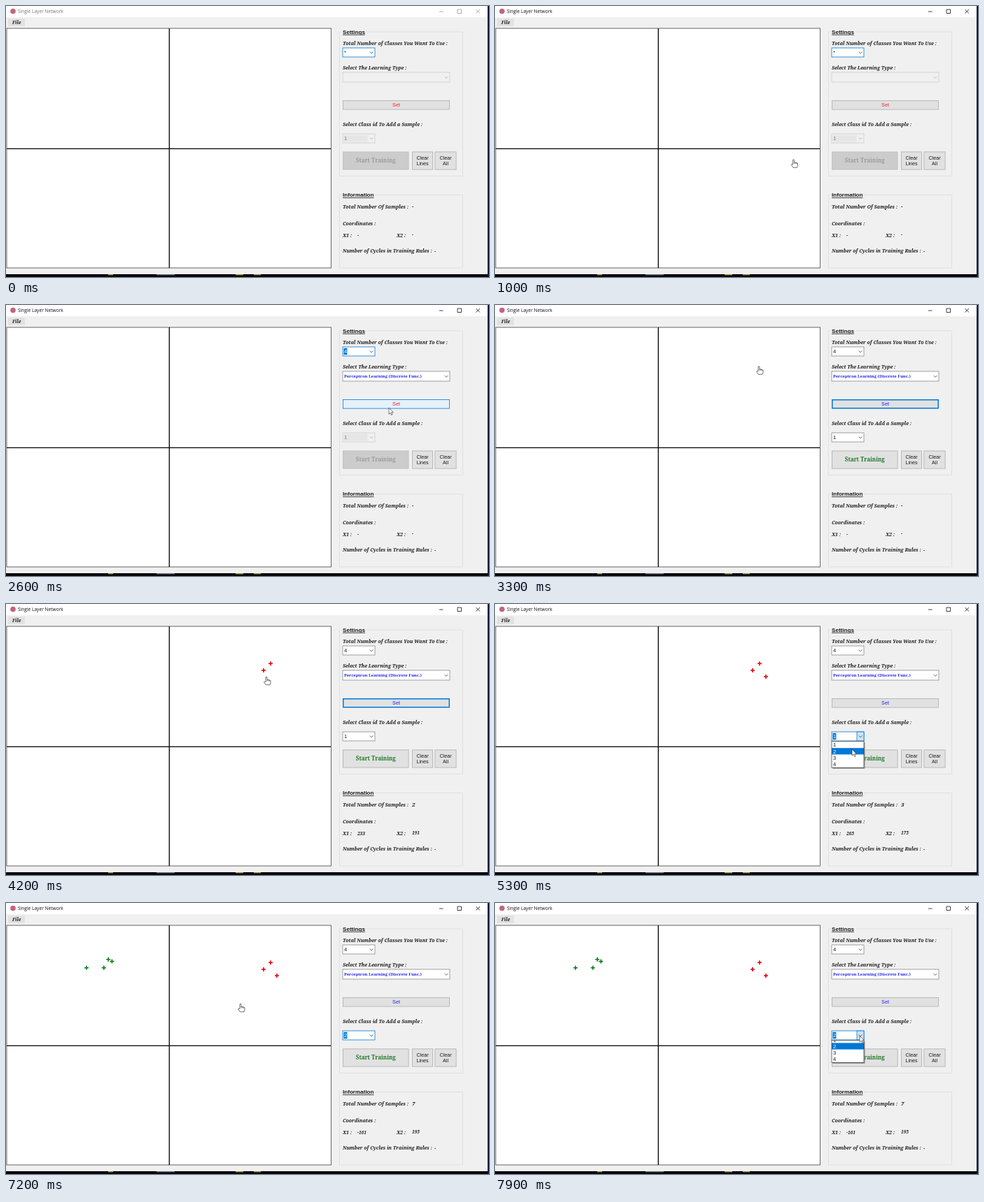
An HTML page for the animation above (8 s loop, 690x388 px).

```html
<!DOCTYPE html>
<html lang="en">
<head>
<meta charset="utf-8">
<title>Single Layer Network</title>
<style>
  html, body { margin: 0; width: 100%; height: 100%; overflow: hidden; background: #f0f0f0; }
  svg { display: block; width: 100vw; height: 100vh; }
  text { white-space: pre; }
  .sans { font-family: "Liberation Sans", Arial, sans-serif; }
  .ui { font-family: "Open Sans", "Noto Sans", sans-serif; }
  .head { font: bold 8.1px "Liberation Sans", Arial, sans-serif; text-decoration: underline; }
  .serif { font-family: "Noto Serif", serif; font-weight: bold; }
  .label { font-family: "Noto Serif", serif; font-weight: bold; font-style: italic; }
</style>
</head>
<body>
<svg id="stage" viewBox="0 0 690 388" preserveAspectRatio="none"><g id="base"></g><g id="live"></g></svg>
<script>
const LOOP = 8000, STEP = 100;
const BLUE = '#0078d7', GREY = '#adadad', INK = '#1a1a1a';

const rect = (x, y, w, h, fill, stroke = 'none', sw = 1) =>
  `<rect x="${x}" y="${y}" width="${w}" height="${h}" fill="${fill}" stroke="${stroke}" stroke-width="${sw}"/>`;
const path = (d, stroke, sw = 1, fill = 'none') =>
  `<path d="${d}" fill="${fill}" stroke="${stroke}" stroke-width="${sw}"/>`;
const text = (x, y, s, cls, size, fill = INK, anchor = 'start') =>
  `<text x="${x}" y="${y}" class="${cls}" font-size="${size}" fill="${fill}" text-anchor="${anchor}">${s}</text>`;
const label = (x, y, s, size = 6.9) => text(x, y, s, 'label', size);

// Pointer tip: time, x, y
const route = [
  [700, 332, 372], [1300, 521, 67], [1500, 521, 67], [1700, 505, 95], [1800, 505, 95],
  [1900, 627, 102], [2000, 627, 102], [2100, 560, 123], [2200, 560, 115], [2300, 552, 137],
  [2600, 547, 147], [2700, 547, 147], [2900, 440, 150], [3000, 332, 130], [3200, 376, 90],
  [3400, 378, 85], [3600, 378, 85], [3900, 368, 95], [4000, 368, 95], [4200, 372, 104],
  [4500, 387, 104], [4700, 387, 104], [5000, 517, 178], [5100, 522, 188], [5200, 522, 188],
  [5300, 510, 208], [5600, 510, 208], [6000, 146, 81], [6100, 146, 81], [6300, 115, 94],
  [6500, 115, 94], [6700, 151, 84], [6800, 151, 84], [7000, 140, 93], [7100, 140, 93],
  [7300, 530, 195], [7400, 521, 190], [8000, 521, 190]
];

const samples = [
  { t: 3500, x: 378, y: 85.3, id: 1 }, { t: 4000, x: 368, y: 95, id: 1 },
  { t: 4600, x: 387, y: 104, id: 1 }, { t: 6000, x: 146.2, y: 80.8, id: 2 },
  { t: 6300, x: 115, y: 92.8, id: 2 }, { t: 6700, x: 151.4, y: 83.6, id: 2 },
  { t: 7100, x: 139.8, y: 92.8, id: 2 }
];
const colors = { 1: '#e3000f', 2: '#0b7a1c' };
const coords = p => [Math.round((p.x - 233) * 1.7235), Math.round((204 - p.y) * 1.753)];

function pointer(t) {
  if (t < route[0][0]) return null;
  const i = route.findIndex(k => k[0] > t);
  const [t0, x0, y0] = route[i - 1], [t1, x1, y1] = route[i];
  const u = (t - t0) / (t1 - t0);
  return [x0 + (x1 - x0) * u, y0 + (y1 - y0) * u];
}

function drawPointer([x, y]) {
  const hand = x < 464 && y > 32 && y < 375;
  const shape = hand
    ? path('M-1 .8Q0-.4 1 .8V4.4L3 4.6 5 5.1 6 6.2V9L5 11.8H-.6L-3.4 7.8Q-3.2 6.2-1 7.6ZM1 4.4V6.5M3 4.6V6.6M5 5.1V6.8', '#333', .7, '#fff')
    : path('M0 0V9.2L2.1 7.3 3.6 10.5 5 9.9 3.6 6.8H6.4Z', '#222', .6, '#fff');
  return `<g transform="translate(${x} ${y})">${shape}</g>`;
}

function combo(x, y, w, h, value, o = {}) {
  const size = o.size || 7.6, base = y + h / 2 + size * .35;
  const edge = o.off ? '#cccccc' : o.focus || o.open ? BLUE : '#8a8a8a';
  let s = rect(x, y, w, h, o.off ? '#f0f0f0' : '#fff', edge, .8);
  if (o.off && value) s += rect(x + 1.5, y + 1.5, w - 12, h - 3, '#e6e6e6');
  if (o.open) s += rect(x + w - 10, y, 10, h, '#cce4f7', BLUE, .8);
  if (o.mark) s += rect(x + 1.4, y + 1.8, 5, h - 3.6, BLUE);
  s += text(x + 2, base, value, o.cls || 'sans', size, o.mark ? '#fff' : o.off ? '#777' : o.ink || INK);
  const ax = x + w - 5, ay = y + h / 2;
  return s + path(`M${ax - 2.4} ${ay - 1}l2.4 2.4 2.4-2.4`, o.off ? '#aaa' : '#444', .8);
}

function list(x, y, w, items, hot, o = {}) {
  const row = 9.2, lift = o.lift || 0, h = items.length * row + 1 - lift;
  let s = rect(x + 1.5, y + 1.5, w, h, '#999') + `<svg x="${x}" y="${y}" width="${w}" height="${h}">` + rect(0, 0, w, h, '#fff');
  items.forEach((v, i) => {
    const top = i * row + .5 - lift;
    if (i === hot) s += rect(0, top, w, row, BLUE);
    s += text(2, top + 7.3, v, o.cls || 'sans', o.size || 7.6, i === hot ? '#fff' : o.ink || INK);
  });
  return s + '</svg>' + rect(x, y, w, h, 'none', '#333', .7);
}

function button(x, y, w, h, lines, o = {}) {
  const sw = o.sw || .8, size = o.size || 7.2;
  let s = rect(x + sw / 2, y + sw / 2, w - sw, h - sw, o.fill || '#e1e1e1', o.edge || GREY, sw);
  lines.forEach((v, i) => {
    const mid = y + h / 2 + (i - (lines.length - 1) / 2) * 8.6;
    s += text(x + w / 2, mid + size * .36, v, o.cls || 'sans', size, o.ink || INK, 'middle');
  });
  return s;
}

function drawBase() {
  const group = (y, h, name, w) =>
    rect(476.5, y, 176, h, 'none', '#dcdcdc', .8) + rect(479, y - 3, w, 6, '#f0f0f0') +
    `<text x="481" y="${y + 2.8}" class="head" fill="${INK}">${name}</text>`;
  const glow = (x, w, c) => rect(x, 384, w, 1.4, c);
  return rect(0, 0, 690, 388, '#f0f0f0') + rect(0, 0, 690, 16, '#fff') +
    '<circle cx="10" cy="7.5" r="3.8" fill="#c4647c"/>' +
    rect(3, 18, 24, 11, '#e2e2e2') + label(9, 25.6, 'File', 6.6) +
    rect(1, 32, 463.5, 343, '#fff', '#555', .9) + path('M233.3 32V375M1 204.3H464', '#000', 1.3) +
    group(37, 206.5, 'Settings', 36) + group(270.5, 104.5, 'Information', 48) +
    label(481, 56, 'Total Number of Classes You Want To Use :') +
    label(481, 91, 'Select The Learning Type :') +
    label(481, 171.7, 'Select Class id To Add a Sample :') +
    label(481, 289.8, 'Total Number Of Samples :') +
    label(481, 313.6, 'Coordinates :') + label(481, 330.8, 'X1 :') + label(558, 330.8, 'X2 :') +
    label(481, 353.4, 'Number of Cycles in Training Rules :') + label(612, 353.4, '-') +
    button(580, 208.5, 30, 26, ['Clear', 'Lines']) + button(612.5, 208.5, 31, 26, ['Clear', 'All']) +
    rect(0, 384, 690, 4, '#05070c') + rect(688, 0, 2, 388, '#0b1c3c') +
    glow(146, 7, '#a89440') + glow(215, 26, '#6d7480') + glow(328, 11, '#b59a3c') + glow(354, 10, '#a89440');
}

function drawLive(t) {
  const active = t >= 700, set = t >= 2700, typed = t >= 2200;
  const openCount = t >= 1500 && t < 1800, openType = t >= 2000 && t < 2200;
  const openClass = t >= 5200 && t < 5600 || t >= 7900;
  const tint = active ? '#111' : '#999';
  const onSet = !set && t >= 2400;
  const id = t >= 5600 ? 2 : 1;
  const done = samples.filter(p => p.t <= t), last = done[done.length - 1];
  const xy = last ? coords(last) : ['-', '-'];

  let s = text(17, 10, 'Single Layer Network', 'ui', 6.6, active ? '#111' : '#777') +
    path('M619 8H624.5M645 5H650.5V10.5H645ZM671.5 5L677 10.5M677 5L671.5 10.5', tint, .8);

  for (const p of done) s += path(`M${p.x - 3} ${p.y}h6M${p.x} ${p.y - 3}v6`, colors[p.id], 1.6);

  s += combo(481, 60, 46, 13, t < 1800 ? '*' : '4', {
    focus: t < 2000 || onSet, open: openCount, mark: t >= 1500 && !set });
  s += combo(481, 95, 153, 14, typed ? 'Perceptron Learning (Discrete Func.)' : '', {
    off: t < 1800, open: openType, cls: 'serif', size: 5.9, ink: '#2424e8' });
  s += button(481, 135, 153, 13.5, ['Set'], set
    ? { ink: '#2424f0', edge: t < 5200 ? BLUE : GREY, sw: t < 5200 ? 1.5 : .8 }
    : { ink: '#f0203c', edge: onSet ? BLUE : GREY, fill: onSet ? '#e5f1fb' : '#e1e1e1' });
  s += combo(481, 183, 46, 13, id, { off: !set, focus: t >= 5200, open: openClass, mark: t >= 5200 });
  s += button(481, 208.5, 94.5, 26, ['Start Training'], {
    cls: 'serif', size: 8, ink: set ? '#1f7a2b' : '#9c9c9c', fill: set ? '#e1e1e1' : '#cccccc', edge: set ? GREY : '#bfbfbf' });

  s += label(580, 290, done.length || '-', 7.8) + label(502, 331, xy[0], 6.4) + label(580, 329.6, xy[1], 6.4);

  if (openCount) s += list(481, 73.5, 46, [2, 3, 4, 5, 6, 7, 8, 9], t >= 1600 ? 2 : -1);
  if (openType) s += list(481, 109.5, 153, ['Perceptron Learning (Discrete Func.)', 'Delta Learning (Continuous Func.)'],
    t >= 2100 ? 0 : -1, { cls: 'serif', size: 5.9, ink: '#2424e8' });
  if (openClass) s += list(481, 196.5, 46, [1, 2, 3, 4], t < 5300 ? 0 : 1, { lift: t >= 7900 ? 5.8 : 0 });

  const tip = pointer(t);
  return tip ? s + drawPointer(tip) : s;
}

const live = document.getElementById('live');
document.getElementById('base').innerHTML = drawBase();
const start = performance.now();
let shown = -1;

function tick() {
  const t = Math.floor((performance.now() - start) % LOOP / STEP) * STEP;
  if (t !== shown) live.innerHTML = drawLive(shown = t);
  requestAnimationFrame(tick);
}
tick();
</script>
</body>
</html>
```
